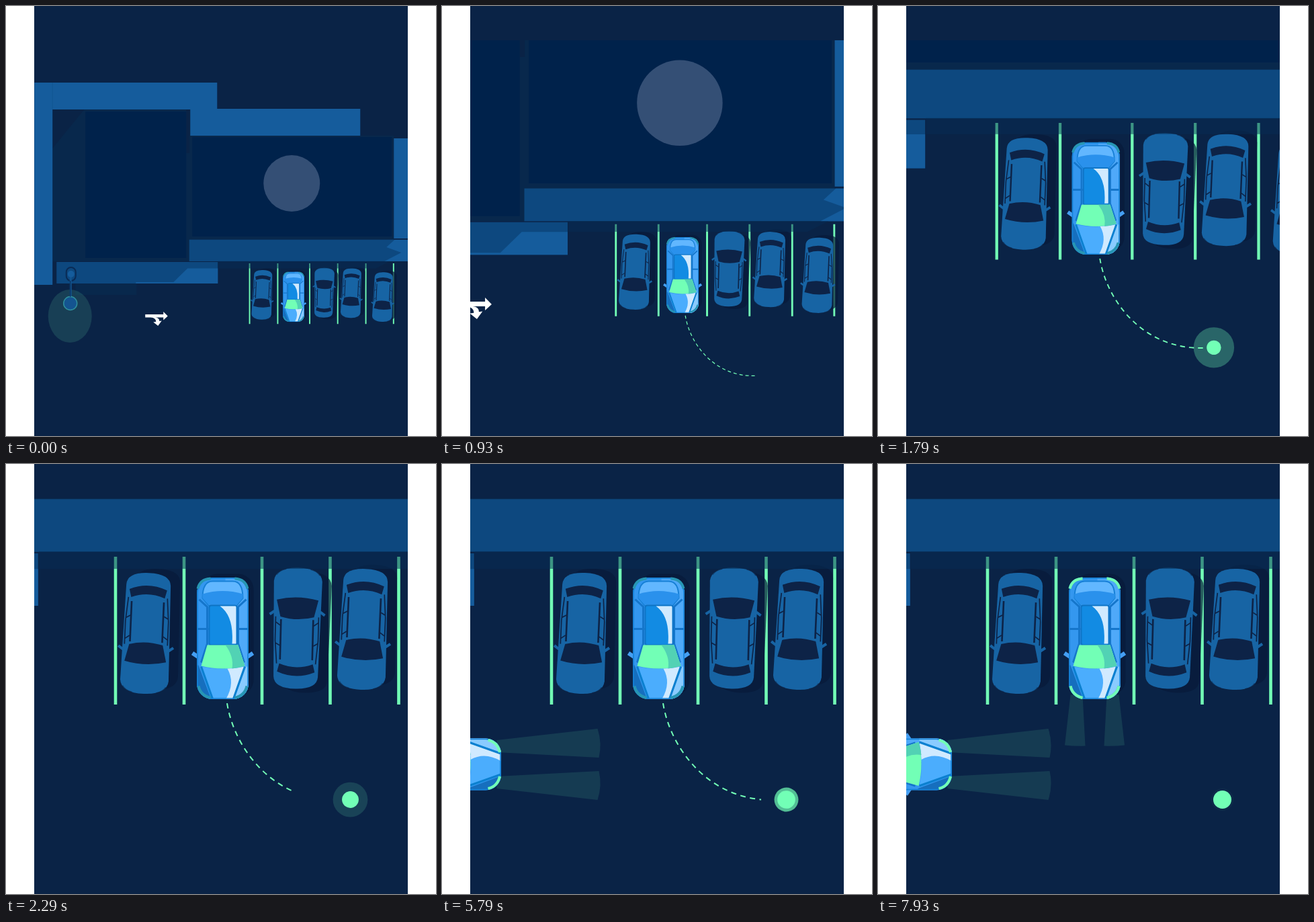
Write an HTML page that moves like this. It is 640 px wide and 640 px high and loops after 8 s.

```html
<!DOCTYPE html>
<html lang="en">
<head>
<meta charset="utf-8">
<title>Parking lot</title>
<style>
  html, body { margin: 0; width: 100%; height: 100%; overflow: hidden; background: #fff; }
  svg { display: block; }
</style>
</head>
<body>
<svg width="100%" height="100%" viewBox="0 0 640 640">
  <defs>
    <clipPath id="stage"><rect x="42" width="556" height="640"/></clipPath>
    <clipPath id="bodyClip"><rect x="-38.5" y="-90.5" width="77" height="181" rx="23"/></clipPath>
    <mask id="trim" maskUnits="userSpaceOnUse" x="300" y="330" width="240" height="200">
      <path id="trimLine" d="M329 356C340 425 400 505 500 500" fill="none" stroke="#fff" stroke-width="10" pathLength="1"/>
    </mask>

    <path id="parkedShape" d="M-33-72Q-32-90 0-90Q32-90 33-72L35 20L36 70Q34 90 0 90Q-34 90-36 70L-35 20Z"/>
    <g id="parked">
      <path d="M-34 25L-41 20M34 25L41 20" stroke="#1764a4" stroke-width="4"/>
      <use href="#parkedShape" fill="#1764a4"/>
      <g fill="#0d2347">
        <path d="M-28-65Q0-77 28-65L25-53Q0-63-25-53Z"/>
        <path d="M-25 17Q0 10 25 17L31 42Q0 50-31 42Z"/>
      </g>
      <g fill="none" stroke="#0d2347">
        <path d="M-24-47V13M24-47V13" stroke-width="2.6"/>
        <path d="M-29-53L-32-18V17M29-53L32-18V17M-32-22L-25-26M32-22L25-26M-32 9L-25 4M32 9L25 4" stroke-width="1.7"/>
        <path d="M-32 79Q-28 86-18 88M32 79Q28 86 18 88" stroke-width="1.2" opacity=".6"/>
      </g>
    </g>

    <g id="hero">
      <path d="M-36 28L-45 22M36 28L45 22" stroke="#459ff3" stroke-width="6"/>
      <g clip-path="url(#bodyClip)">
        <rect x="-39" y="-91" width="78" height="182" fill="#3497ef"/>
        <path d="M4-91H39V91H4Z" fill="#4fa9f9"/>
        <path d="M-36 40L-17 91H-39V40Z" fill="#166fbe"/>
        <path d="M35 42L17 91H39V42Z" fill="#8acbff"/>
        <path d="M-30-60Q-30-85-15-85H15Q30-85 30-60L21-49H-21Z" fill="#62b7ff" stroke="#1780d6" stroke-width="2"/>
        <path d="M-30-66Q0-75 30-66V-60L21-50H-21L-30-60Z" fill="#2a91ec"/>
        <path d="M-35-58L-23-47V8L-32 36M35-58L23-47V8L32 36M-38-14H-21M38-14H21" fill="none" stroke="#1576cb" stroke-width="3"/>
        <rect x="-20" y="-49" width="41" height="59" rx="3" fill="#128be3" stroke="#0d73c5" stroke-width="2"/>
        <path d="M-4-48H19Q20-48 20-46V8H14Q17-33-4-48Z" fill="#d0eaff"/>
        <path d="M-32 42Q0 49 33 42L16 90H-16Z" fill="#4badfd"/>
        <path d="M7 45Q20 45 33 42L16 90H5Q19 66 7 45Z" fill="#d0eaff"/>
        <path d="M-32 42L-15 90M33 42L16 90" stroke="#0b80d0" stroke-width="3"/>
        <path d="M-23 10H23L33 41Q0 49-32 41Z" fill="#72ffb6"/>
        <path d="M4 10H23L33 41Q24 44 14 45Q17 27 4 10Z" fill="#52d2b4"/>
      </g>
      <rect x="-37.5" y="-89.5" width="75" height="179" rx="22" fill="none" stroke="#1381d6" stroke-width="1.6"/>
    </g>
    <path id="lamps" fill="none" stroke-width="4"
      d="M-37-74Q-34-88-18-89M37-74Q34-88 18-89M-36 71Q-33 85-18 88.5M36 71Q33 85 18 88.5"/>
  </defs>

  <g clip-path="url(#stage)">
    <rect x="42" width="556" height="640" fill="#0a2346"/>
    <g id="world">
      <!-- Buildings, laid out in the units of the widest view -->
      <g transform="scale(2.4366) translate(-295.4 -326.4)">
        <path d="M69 154H274V380H69Z" fill="#08284c"/>
        <path d="M69 154L118 152L69 212ZM268 154H276V219H268Z" fill="#0a2346"/>
        <path d="M273 193H577V348H273Z" fill="#08284c"/>
        <path d="M118 157H268V375H118ZM277 195H574V343H277Z" fill="#00224b"/>
        <path d="M42 114H314V153H527V193H274V154H69V415H42ZM577 197H640V346H577Z" fill="#155c9c"/>
        <path d="M69 114V154" stroke="#12548f" stroke-width=".6"/>
        <circle cx="425" cy="264" r="42" fill="#344f75"/>
        <path d="M272.5 347.8H640V380H272.5ZM75 381H315V413H75Z" fill="#0d487f"/>
        <path d="M640 348H578L566 359L588 367L563 380H640ZM270 390.5H315V413H193V411H249Z" fill="#155c9c"/>
        <path d="M103 413H194V430H103Z" fill="#08284c"/>
        <ellipse cx="95" cy="461.5" rx="32.5" ry="39.5" fill="#72ffb6" opacity=".13"/>
        <rect x="89.5" y="389" width="14" height="20" rx="7" fill="#0d487f" stroke="#0a2b55" stroke-width="2"/>
        <circle cx="96.5" cy="399" r="5" fill="#155c9c"/>
        <path d="M96 404V434" stroke="#12548f" stroke-width="3"/>
        <circle cx="95.5" cy="442.5" r="10" fill="#145490" stroke="#2f8f9c" stroke-width="1.5"/>
        <path d="M95.5 409V433" stroke="#0a2b55"/>
        <path d="M207 459H234V455L240.5 461.5L234 467.5V463.5H222Q228 464 228 469L231.5 468.5L226 476L219 470.5L223 470Q223 464 215 463.5H207Z" fill="#fff"/>
      </g>
      <path d="M163 138V358M265 138V358M381 138V358M482.5 138V358M584.5 138V358M685 138V358" stroke="#72ffb6" stroke-width="4.6"/>
      <g id="parkedCars"></g>
      <path d="M49 130H672L621 156H49Z" fill="#062d54" opacity=".5"/>
      <path d="M329 356C340 425 400 505 500 500" mask="url(#trim)" fill="none" stroke="#72ffb6" stroke-width="2" stroke-dasharray="8 6.5"/>
      <circle id="ring" cx="512.5" cy="499.5" fill="#72ffb6"/>
      <circle id="dot" cx="512.5" cy="499.5" fill="#72ffb6"/>

      <g transform="translate(322.5 259.5)">
        <path id="heroBeams" fill="#72ffb6" opacity=".11"/>
        <rect x="-31" y="-96" width="77" height="181" rx="23" fill="#081b39" opacity=".7"/>
        <use href="#hero"/>
        <use href="#lamps" stroke="#2796b4"/>
        <use id="heroLamps" href="#lamps" stroke="#72ffb6"/>
      </g>
      <g id="visitor">
        <path id="visitorBeams" fill="#72ffb6" opacity=".11"/>
        <use href="#hero"/>
        <use href="#lamps" stroke="#72ffb6"/>
      </g>
    </g>
    <rect x="42" width="556" height="51" fill="#0a2346"/>
  </g>
</svg>

<script>
const LOOP = 8000;
const $ = id => document.getElementById(id);
const clamp = v => Math.min(1, Math.max(0, v));
const span = (t, start, length) => clamp((t - start) / length);
const smooth = v => v * v * (3 - 2 * v);

// x, y, angle, vertical shadow offset
const parked = [[209, 252, 2.5, -6], [433, 244.5, 181.5, 6], [532, 246, 2.5, -6], [646.5, 260, 2.5, -6]];
$('parkedCars').innerHTML = parked.map(([x, y, angle, drop]) => `
  <use href="#parkedShape" fill="#081b39" opacity=".7" transform="translate(${x + 14} ${y + drop}) rotate(${angle})"/>
  <use href="#parked" transform="translate(${x} ${y}) rotate(${angle})"/>`).join('');

// Two headlight cones reaching the given distance ahead of the bumper
function beams(reach) {
  if (reach <= 0) return '';
  const k = (reach + 6) / 152, inner = 18 - 8 * k, outer = 36 + 17 * k;
  const end = 90 + reach, bulge = end + 5 * k * k * k;
  return [-1, 1].map(s =>
    `M${18 * s} 84L${inner * s} ${end}Q${(inner + outer) / 2 * s} ${bulge} ${outer * s} ${end - 2 * k}L${36 * s} 84Z`
  ).join('');
}
$('visitorBeams').setAttribute('d', beams(146));

function moveCamera(t) {
  const p = smooth(span(t, -10, 2320)), q = 1 - p;
  const scale = 0.4104 + 0.5896 * p;
  const x = -332 * Math.log(scale);
  const y = 326.4 * q + 192 * p * q * (1 - 0.89 * p);
  $('world').setAttribute('transform', `translate(${x} ${y}) scale(${scale})`);
}

function drawRoute(t) {
  const step = start => smooth(span(t, start, 830));
  const shown = step(80) - step(1987) + step(3816) - step(5627);
  $('trimLine').setAttribute('stroke-dasharray', `${shown} 2`);
  $('trimLine').setAttribute('visibility', shown > 0.001 ? 'visible' : 'hidden');
}

function pulse(t) {
  const phase = clamp(((t + 2270) % 2640) / 2380);
  const swell = Math.pow(Math.max(0, Math.sin(Math.PI * phase)), 0.8);
  const ringIn = smooth(span(t, 1450, 350));
  $('ring').setAttribute('r', 12.5 + 21 * swell * ringIn);
  $('ring').setAttribute('opacity', 0.75 * (1 - phase) * ringIn);
  const size = t < 1400 ? 12.5 : 14 - 2.5 * swell;
  $('dot').setAttribute('r', size * smooth(span(t, 1000, 400)));
}

function driveCars(t) {
  const remaining = Math.max(0, 7315 - t) / 2885;
  const front = 110 - 149 * remaining ** 3;
  $('visitor').setAttribute('transform', `translate(${front - 90.5} 447) rotate(-90)`);
  const on = span(t, 7600, 330);
  $('heroLamps').setAttribute('opacity', on);
  $('heroBeams').setAttribute('d', beams(70 * on));
}

function frame() {
  const t = performance.now() % LOOP;
  moveCamera(t);
  drawRoute(t);
  pulse(t);
  driveCars(t);
  requestAnimationFrame(frame);
}
frame();
</script>
</body>
</html>
```
